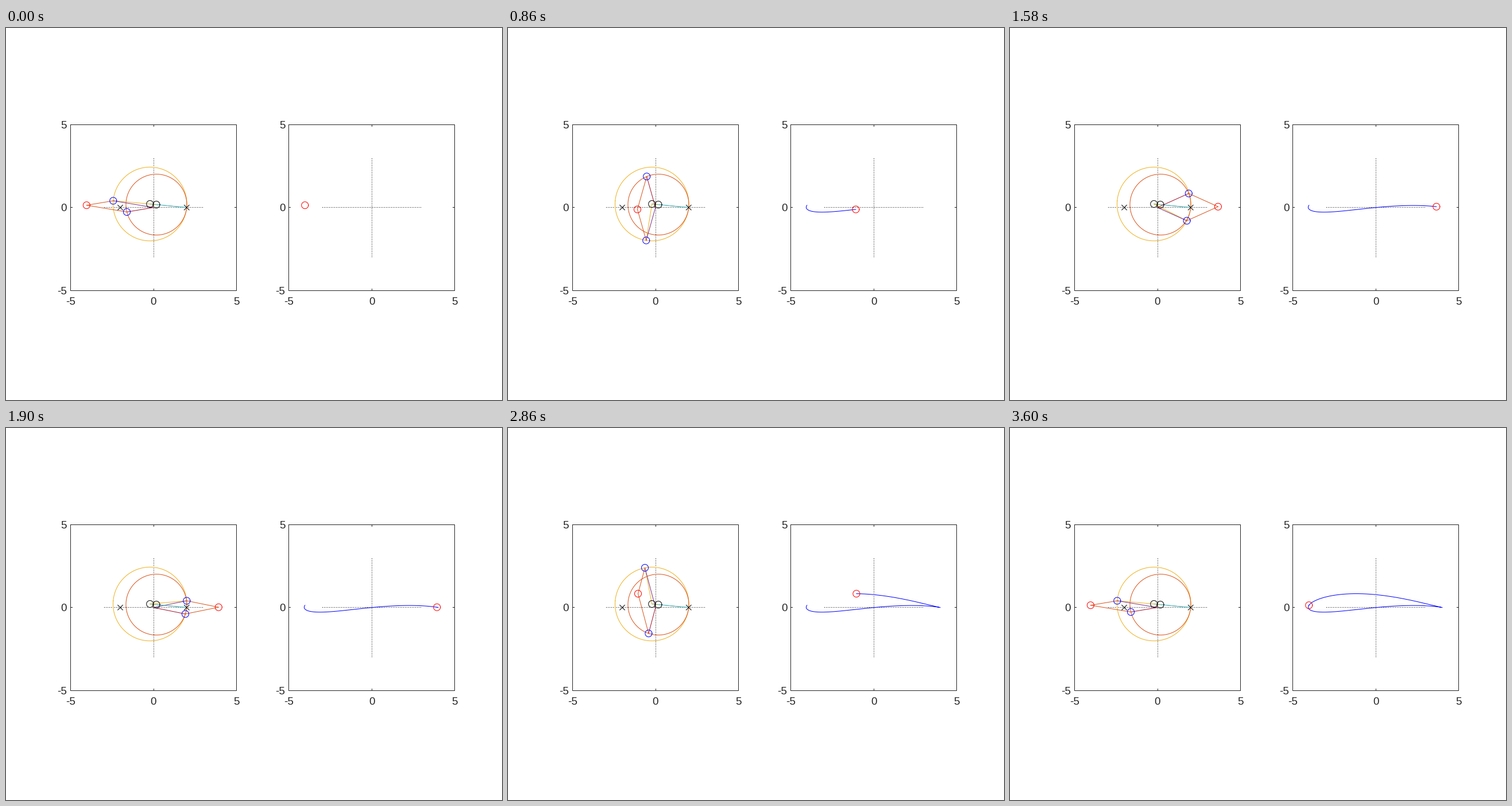
Write a matplotlib script that moves like this. It is 864 px wide and 648 px high and loops after 3620 ms.

```python
import numpy as np
import matplotlib.pyplot as plt
from matplotlib.animation import FuncAnimation

W, H = 864, 648
FRAMES, STEP = 181, 20
UNIT = 28.92                      # pixels per data unit
ORIGIN_Y = 312.7
LEFT_X, RIGHT_X = 256.9, 637.3
HALF = 5 * UNIT
INK = "#262626"
ORANGE, YELLOW, PURPLE = "#D95319", "#EDB120", "#7E2F8E"
GREEN, CYAN, MAROON = "#77AC30", "#4DBEEE", "#A2142F"

plt.rcParams["font.family"] = "Liberation Sans"
plt.rcParams["path.snap"] = False
fig = plt.figure(figsize=(W / 72, H / 72), dpi=72, facecolor="white")
ax = fig.add_axes([0, 0, 1, 1])
ax.set_xlim(0, W)
ax.set_ylim(H, 0)
ax.axis("off")


def to_px(points, ox):
    points = np.array(points, complex)
    return ox + points.real * UNIT, ORIGIN_Y - points.imag * UNIT


def place(artist, points, ox=LEFT_X):
    artist.set_data(*to_px(points, ox))


def line(color, points=(), ox=LEFT_X, z=3):
    return ax.plot(*to_px(points, ox), color=color, lw=1, zorder=z)[0]


RING = 6 / UNIT * np.exp(1j * np.linspace(0, 2 * np.pi, 49))


def ring(color, center=0j, ox=LEFT_X):
    return line(color, center + RING, ox, 5)


def cross(center):
    for arm in (1 + 1j, 1 - 1j):
        d = 4.3 / UNIT * arm
        line("black", [center - d, center + d], z=5)


def panel(left, mid, ox):
    """Frame, ticks, dotted axes and labels; lines sit on pixel centres."""
    top, cy, bottom = 168.5, 312.5, 457.5
    right = left + 289
    ax.plot([left, right, right, left, left], [top, top, bottom, bottom, top],
            color=INK, lw=1, zorder=1)
    for x, d in ((left, 3), (right, -3)):
        ax.plot([x, x + d], [cy, cy], color=INK, lw=1)
    for y, d in ((top, 3), (bottom, -3)):
        ax.plot([mid, mid], [y, y + d], color=INK, lw=1)

    dots = dict(color="black", lw=1, ls=(0, (1, 2)), dash_capstyle="butt",
                zorder=2)
    ax.plot([mid - 86.5, mid + 86.5], [cy, cy], **dots)
    ax.plot([mid, mid], [cy + 86.5, cy - 86.5], **dots)

    font = dict(fontsize=18.7, color=INK, va="baseline")
    for label, k in (("-5", -1), ("0", 0), ("5", 1)):
        ax.text(ox + k * HALF, 482, label, ha="center", **font)
        ax.text(ox - HALF - 6.3, ORIGIN_Y - k * HALF + 6.5, label,
                ha="right", **font)


panel(112.5, 257.5, LEFT_X)
panel(492.5, 637.5, RIGHT_X)

# Joukowski map w = z + a^2 / z of a circle through z = a
a = 2
c1 = 0.3 * np.exp(0.75j * np.pi)
radius = abs(a - c1)
c2 = a**2 * np.conj(c1) / (abs(c1) ** 2 - radius**2)
theta = np.radians(175 + 2 * np.arange(FRAMES))
z = c1 + radius * np.exp(1j * theta)
inv = a**2 / z
w = z + inv

line(YELLOW, z)
line(ORANGE, inv)
arm_c = line(YELLOW)
arm_z = line(PURPLE)
line(GREEN, [c1, a])
line(CYAN, [c2, a])
arm_inv = line(MAROON)
sum_z = line(ORANGE)
sum_inv = line(ORANGE)
trail = line("blue", ox=RIGHT_X)

for c in (c1, c2):
    ring("black", c)
for x in (-a, a):
    cross(x)
dot_z, dot_inv = ring("blue"), ring("blue")
dot_w = ring("red")
dot_foil = ring("red", ox=RIGHT_X)


def update(i):
    place(arm_c, [c1, z[i]])
    place(arm_z, [0, z[i]])
    place(arm_inv, [0, inv[i]])
    place(sum_z, [z[i], w[i]])
    place(sum_inv, [inv[i], w[i]])
    place(dot_z, z[i] + RING)
    place(dot_inv, inv[i] + RING)
    place(dot_w, w[i] + RING)
    place(trail, w[:i + 1], RIGHT_X)
    place(dot_foil, w[i] + RING, RIGHT_X)
    return (arm_c, arm_z, arm_inv, sum_z, sum_inv, dot_z, dot_inv, dot_w,
            trail, dot_foil)


anim = FuncAnimation(fig, update, frames=FRAMES, interval=STEP, repeat=True,
                     repeat_delay=0, blit=False)
plt.show()
```
